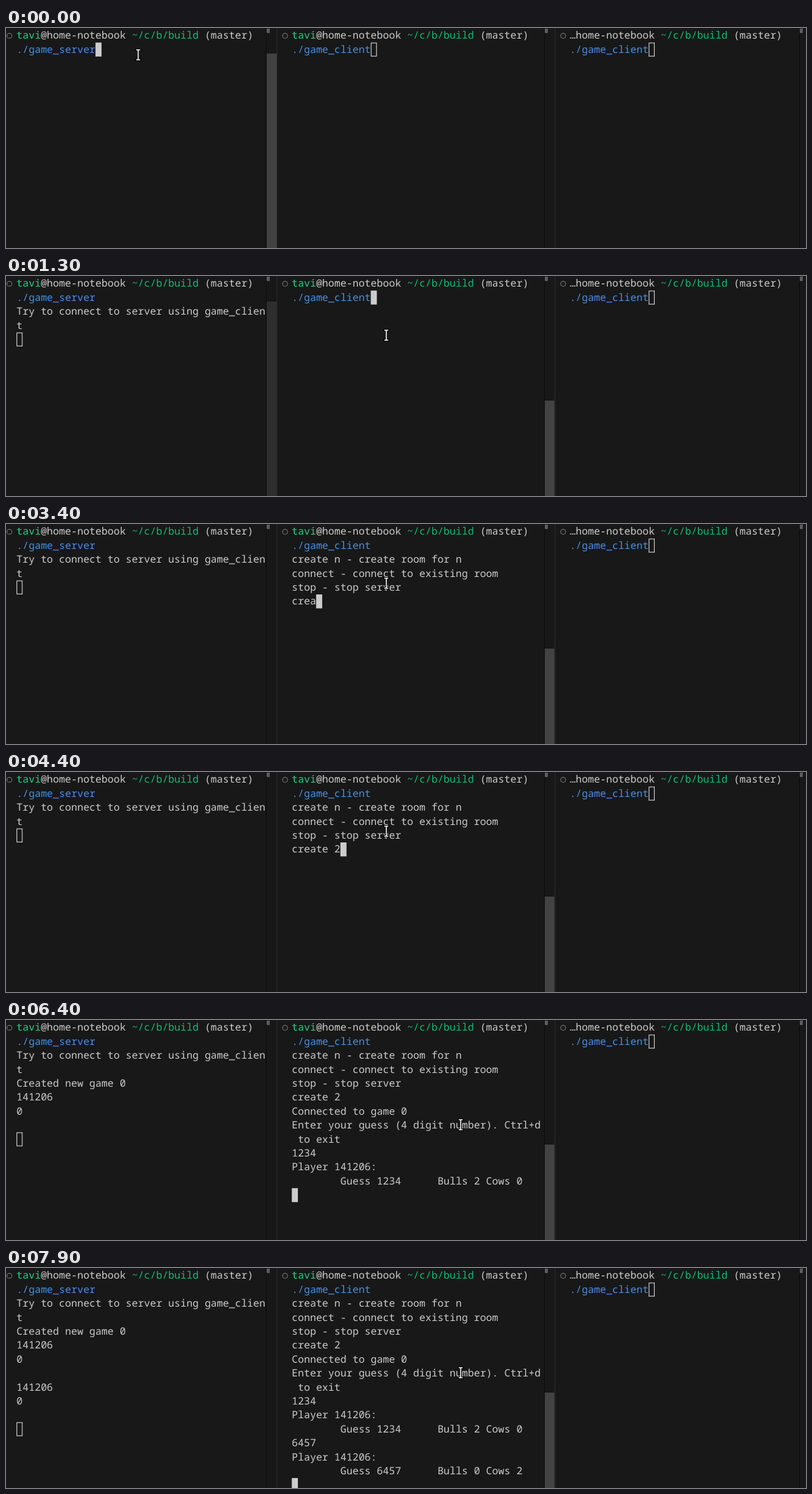
Write an HTML page that moves like this. It is 1280 by 353 pixels and loops after 8 s.

```html
<!DOCTYPE html>
<html lang="en">
<head>
<meta charset="utf-8">
<title>Three terminals</title>
<style>
  html, body { margin: 0; width: 100%; height: 100%; overflow: hidden; background: #181818; }
  svg { display: block; width: 100%; height: 100%; }
  text {
    font: 16.2px "Noto Sans Mono", "DejaVu Sans Mono", monospace;
    font-variant-ligatures: none;
    text-rendering: geometricPrecision;
    white-space: pre;
    fill: #cccccc;
  }
  .user { fill: #23d18b; }
  .path { fill: #0dbc79; }
  .command { fill: #4a90e0; }
</style>
</head>
<body>
<svg id="stage" viewBox="0 0 1280 353"></svg>
<script>
const LOOP = 8000, COLS = 41, CELL = 9.72, ROW = 22.4, TOP = 1;
const stage = document.getElementById('stage');

const set = (node, attrs) => {
  for (const key in attrs) node.setAttribute(key, attrs[key]);
};

function add(tag, attrs = {}, parent = stage, content = '') {
  const node = document.createElementNS('http://www.w3.org/2000/svg', tag);
  set(node, attrs);
  node.textContent = content;
  parent.append(node);
  return node;
}

const rect = (x, y, width, height, fill) => add('rect', { x, y, width, height, fill });
const rowTop = row => TOP + row * ROW;
const baseline = row => rowTop(row) + 16.3;

// Each entry appends its text to the terminal at the given time.
const serverLog = [
  [0, './game_server'],
  [400, '\nTry to connect to server using game_client\n'],
  [4500, 'Created new game 0\n'],
  [6400, '141206\n0\n\n'],
  [7900, '141206\n0\n\n']
];

const typed = (start, text) => [...text].map((char, i) => [start + i * 100, char]);
const result = (guess, bulls, cows) =>
  `\nPlayer 141206:\n        Guess ${guess}      Bulls ${bulls} Cows ${cows}\n`;

const clientLog = [
  [0, './game_client'],
  [1700, '\ncreate n - create room for n\nconnect - connect to existing room\nstop - stop server\n'],
  [2500, 'c'],
  ...typed(3200, 'rea'),
  [3500, 'te'],
  [3800, ' '],
  [4400, '2'],
  [4500, '\nConnected to game 0\nEnter your guess (4 digit number). Ctrl+d to exit\n'],
  ...typed(6000, '1234'),
  [6400, result('1234', 2, 0)],
  ...typed(7100, '6457'),
  [7900, result('6457', 0, 2)]
];

const panes = [
  { x: 16.8, dot: 5.5, bar: 417, log: serverLog, focus: [0, 1300] },
  { x: 457.3, dot: 446.5, bar: 862, log: clientLog, focus: [1300, LOOP] },
  { x: 901.9, dot: 891.5, bar: 1270, log: [[0, './game_client']], focus: [0, 0], short: true }
];

const sliderA = rect(417, 41, 16, 312);
const sliderB = rect(861.5, 200, 16, 153);

function buildPane(pane) {
  rect(pane.bar - 1, 0, 1, 353, '#0a0a0a');
  rect(pane.bar + 16, 0, 1, 353, '#2b2b2b');
  rect(pane.bar, 1, 5, 7, '#5c5c5c');
  add('circle', { cx: pane.dot, cy: 12.5, r: 4, fill: 'none', stroke: '#606060', 'stroke-width': 1.5 });

  const prompt = add('text', { x: pane.x, y: baseline(0) });
  if (!pane.short) add('tspan', { class: 'user' }, prompt, 'tavi');
  add('tspan', {}, prompt, (pane.short ? '…' : '@') + 'home-notebook ');
  add('tspan', { class: 'path' }, prompt, '~/c/b/build');
  add('tspan', {}, prompt, ' (master)');

  pane.rows = Array.from({ length: 15 }, (_, i) =>
    add('text', { x: pane.x, y: baseline(i + 1), class: i ? '' : 'command' }));
  pane.cursor = add('rect', { 'stroke-width': 1.2 });
}

function wrap(line) {
  return line.match(new RegExp(`.{1,${COLS}}`, 'g')) || [''];
}

function drawPane(pane, t) {
  const screen = pane.log.filter(([time]) => time <= t).map(([, text]) => text).join('');
  const lines = screen.split('\n').flatMap(wrap);
  pane.rows.forEach((row, i) => {
    const text = lines[i] || '';
    if (row.textContent !== text) row.textContent = text;
  });

  const x = pane.x + lines.at(-1).length * CELL;
  const y = rowTop(lines.length);
  const focused = t >= pane.focus[0] && t < pane.focus[1];
  set(pane.cursor, focused
    ? { x, y, width: CELL, height: ROW, fill: '#cccccc', stroke: 'none' }
    : { x: x + 0.6, y: y + 0.6, width: CELL - 1.2, height: ROW - 1.2, fill: 'none', stroke: '#cccccc' });
}

// Pointer and scrollbar states: [time, values...]
const pointerSteps = [
  [0, 211.5, 43], [900, 300, 56], [1000, 480, 81], [1100, 608.5, 95],
  [5100, 640, 115], [5200, 695, 149], [5300, 727.5, 168]
];
const sliderASteps = [[0, '#424242'], [1100, '#2e2e2e'], [1700, 'none']];
const sliderBSteps = [[0, 'none'], [1000, '#303030'], [1100, '#434343']];
const at = (steps, t) => steps.findLast(([time]) => time <= t).slice(1);

panes.forEach(buildPane);
const pointer = add('g', { fill: 'none' });
const beam = 'M-3.2-8H3.2M0-8V8M-3.2 8H3.2';
add('path', { d: beam, stroke: '#000', 'stroke-width': 3.6, 'stroke-linecap': 'square' }, pointer);
add('path', { d: beam, stroke: '#fff', 'stroke-width': 1.7 }, pointer);

function draw(now) {
  const t = now % LOOP;
  panes.forEach(pane => drawPane(pane, t));
  set(sliderA, { fill: at(sliderASteps, t)[0] });
  set(sliderB, { fill: at(sliderBSteps, t)[0] });
  set(pointer, { transform: `translate(${at(pointerSteps, t)})` });
}

const start = performance.now();
function tick(now) {
  draw(Math.max(0, now - start));
  requestAnimationFrame(tick);
}
draw(0);
requestAnimationFrame(tick);
</script>
</body>
</html>
```
